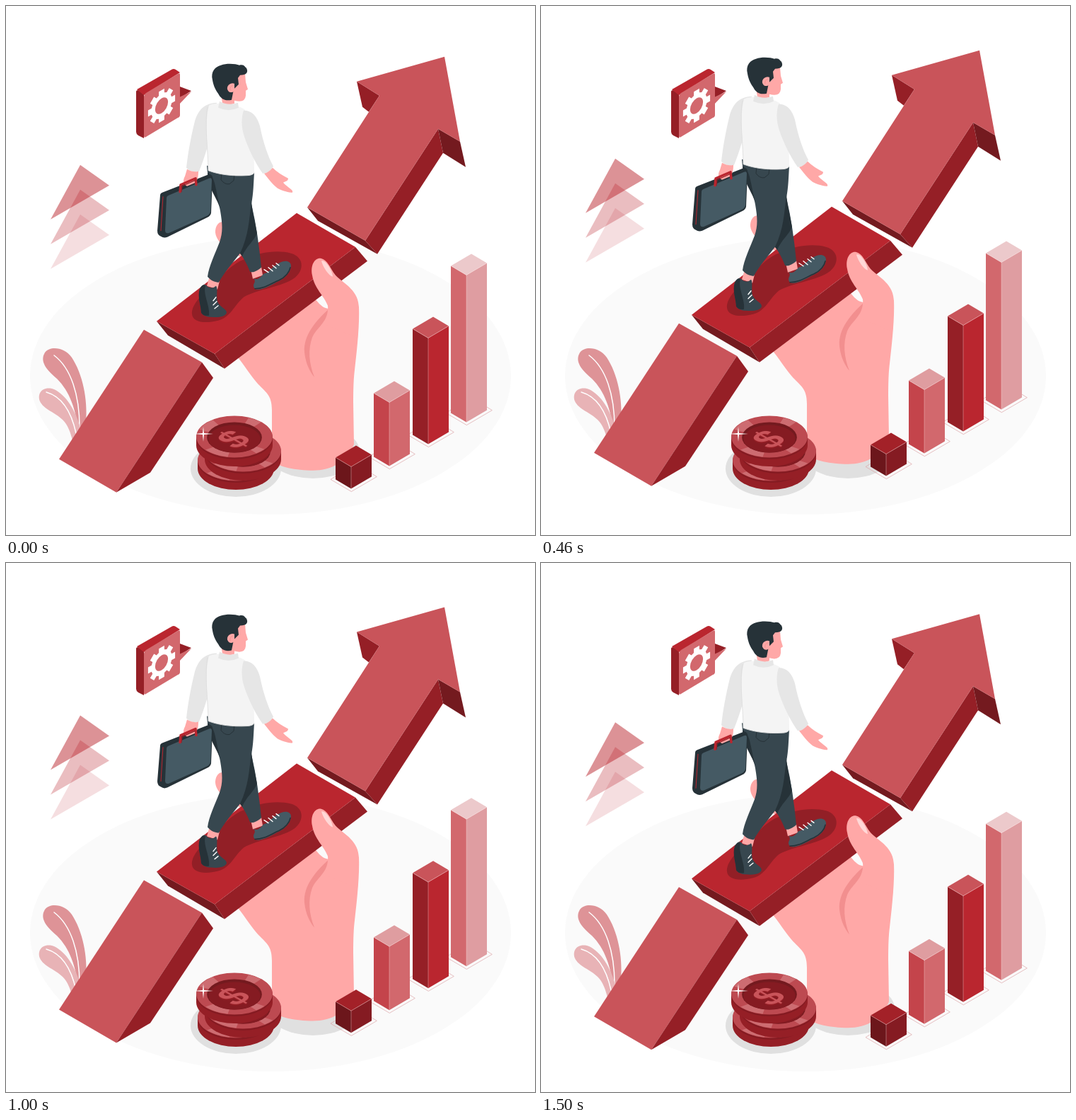
An HTML page with a canvas for the animation above (1.54 s loop, 748 px wide and 748 px high).

```html
<!DOCTYPE html>
<html lang="en">
<head>
<meta charset="utf-8">
<title>Growth</title>
<style>
html, body { margin: 0; width: 100%; height: 100%; overflow: hidden; background: #fff; }
canvas { display: block; width: 748px; height: 748px; }
</style>
</head>
<body>
<canvas id="stage" width="748" height="748"></canvas>
<script>
const ctx = document.getElementById('stage').getContext('2d');
const LOOP = 1540, LEAD = 35, RISE = 15;
const RED = '#ba262f', DEEP = '#951f26', DARK = '#741a1f', ROSE = '#c9545a', PALE = '#d2686d';
const SKIN = '#ffa8a7', SKIN_SHADE = '#f28f8f', INK = '#263238', SLATE = '#37474f', STEEL = '#455a64';
const SLEEVE = '#e6e6e6';

const paths = new Map();
function path(d) {
  if (!paths.has(d)) paths.set(d, new Path2D(d));
  return paths.get(d);
}
function fill(color, d) {
  ctx.fillStyle = color;
  ctx.fill(path(d));
}
function line(color, width, d) {
  ctx.strokeStyle = color;
  ctx.lineWidth = width;
  ctx.lineCap = ctx.lineJoin = 'round';
  ctx.stroke(path(d));
}
function oval(color, x, y, rx, ry) {
  ctx.fillStyle = color;
  ctx.beginPath();
  ctx.ellipse(x, y, rx, ry, 0, 0, Math.PI * 2);
  ctx.fill();
}
function shifted(x, y, draw) {
  ctx.save();
  ctx.translate(x, y);
  draw();
  ctx.restore();
}

function drawGround() {
  oval('#fafafa', 374, 523, 340, 196);
  oval('#e0e0e0', 434, 630, 66, 38);
  oval('#e0e0e0', 325, 654, 64, 40);
}

function drawLeaves() {
  fill('#de9397', 'M113 590C116 555 108 520 93 497C83 483 63 480 55 490C47 503 58 515 72 527C90 545 99 570 103 605Z');
  line('#fff', 1.5, 'M68 494C92 512 104 550 104 596');
  fill('#e8b3b6', 'M105 596C97 567 81 546 65 541C50 538 44 549 48 559C53 570 70 575 80 585C88 593 91 603 94 614Z');
  line('#fff', 1.5, 'M57 546C78 552 92 572 99 604');
}

function drawGear() {
  fill(DEEP, 'M184 121Q184 119 187 119L195 125V187L187 183Q184 181 184 178Z');
  fill(RED, 'M185 118L234 90Q237 88 240 90L246 94L195 126Z');
  fill(PALE, 'M195 128Q195 125 198 123L243 96Q246 94 246 97V154Q246 157 243 158L198 185Q195 187 195 184Z');
  fill(DEEP, 'M246 114L262 120L246 130Z');
  fill(PALE, 'M245 129L262 121L245 139Z');
  ctx.save();
  ctx.transform(.866, -.5, 0, 1, 220, 141);
  ctx.fillStyle = '#fff';
  ctx.beginPath();
  for (let i = 0; i < 8; i++) {
    const a = i * Math.PI / 4;
    for (const [da, r] of [[-.27, 17], [-.2, 22.5], [.2, 22.5], [.27, 17]])
      ctx.lineTo(r * Math.cos(a + da), r * Math.sin(a + da));
  }
  ctx.closePath();
  ctx.moveTo(10.5, 0);
  ctx.arc(0, 0, 10.5, 0, Math.PI * 2, true);
  ctx.fill();
  ctx.restore();
}

function drawTriangles() {
  [.5, .3, .15].forEach((alpha, i) => shifted(0, i * 35, () => {
    ctx.globalAlpha = alpha;
    fill(RED, 'M105 225L146 254L63 302Z');
  }));
}

function drawArrow() {
  fill(ROSE, 'M195 458L277 504L156 688L75 641Z');
  fill(DEEP, 'M277 504L293 526L204 660L156 688Z');

  fill(DEEP, 'M496 107L528 127L513 150L504 143Z');
  fill(DARK, 'M426 285L508 332L525 351L441 304Z');
  fill(DEEP, 'M611 174L618 208L525 351L508 332Z');
  fill(DARK, 'M611 174L642 192L650 228L618 208Z');
  fill(ROSE, 'M620 72L642 192L611 174L508 332L426 285L528 127L496 107Z');
}

function drawPlatform() {
  fill(DARK, 'M213 446L295 492L309 513L229 466Z');
  fill(DEEP, 'M295 492L494 341L511 361L309 513Z');
  fill(RED, 'M213 446L411 293L494 341L295 492Z');
  fill('#921f26', 'M263 436C262 424 274 411 288 398C306 382 318 365 338 358C358 348 385 345 403 350C421 355 422 373 409 384C391 398 356 400 336 412C322 424 318 440 300 445C280 450 264 447 263 436Z');
}

function drawPalm() {
  fill(SKIN, 'M337 358C314 347 295 333 296 318C297 308 303 304 309 306L345 330Z');
  fill(SKIN, 'M326 495L425 400L441 419C447 426 452 428 456 428L499 425C500 450 497 480 493 515Q491 530 491 560L492 620C482 645 460 657 434 657C410 657 385 652 376 643V572C376 549 367 547 354 532C344 520 337 508 326 495Z');
}

function drawThumb() {
  fill(SKIN, 'M433 381C430 366 437 356 445 357C455 359 458 371 466 381C479 394 499 402 499 428L497 470L449 450C454 444 456 434 455 424C450 410 436 400 433 381Z');
  fill('#ffd8d7', 'M446 361C451 358 461 373 462 383C456 381 449 371 446 361Z');
  fill(SKIN_SHADE, 'M455 430C440 444 420 465 422 490C424 508 431 519 436 525C428 505 427 485 433 469C439 455 454 448 455 430Z');
}

function drawLegs() {
  fill(SKIN, 'M288 382L302 389L299 401L284 396Z');
  fill(SKIN, 'M345 368L361 369L363 381L349 386Z');
  fill(STEEL, 'M349 383C352 389 358 387 364 379C373 377 375 370 384 365C393 359 403 360 403 368C402 377 396 384 386 389C376 394 364 402 355 401C350 400 349 396 351 392C353 389 351 386 349 383Z');
  line(INK, 1.6, 'M352 400C366 400 376 392 386 388C395 384 401 376 402 370');
  line('#fff', 1.4, 'M365 373L371 377M371 370L377 375M377 367L382 371M382 364L386 367');
  fill(SLATE, 'M274 401C277 393 282 392 285 397Q292 401 297 396C300 400 297 409 299 418C303 427 312 428 312 434C310 440 300 441 290 440C284 440 279 438 276 434C276 425 271 412 274 401Z');
  fill(INK, 'M274 400Q278 393 282 396C278 407 289 425 287 438Q279 439 276 434C276 424 270 412 274 400Z');
  line('#fff', 1.4, 'M297 412L293 417M298 418L293 423M300 424L295 428');

  fill(SLATE, 'M284 226C286 258 300 270 303 290C306 308 307 320 302 334C295 352 287 368 285 383C290 389 296 391 301 391C308 378 319 365 331 350C337 358 341 366 345 376C350 378 356 374 361 370C358 340 354 310 347 280C350 265 350 250 351 236Z');
  fill(INK, 'M347 276C348 292 353 308 355 322C350 333 340 340 334 354L331 350C343 325 344 302 347 276Z');
  fill(INK, 'M285 236C296 240 296 260 303 286C296 268 286 258 285 236Z');
  line(INK, 1, 'M305 236L304 246Q309 253 316 252L322 247L323 238');
}

function drawTorso() {
  fill(SLEEVE, 'M298 137C279 138 272 148 267 163C261 187 257 210 255 229C261 235 268 236 273 234C281 215 286 195 292 175Z');
  fill('#f4f4f4', 'M287 141C293 136 324 137 338 147C343 175 352 200 351 236Q349 240 340 240C321 241 302 239 286 233C286 205 280 165 287 141Z');
  line('#dedede', .9, 'M285 143C280 165 286 205 286 233C302 239 321 241 340 240Q349 240 351 236');
  fill(SLEEVE, 'M336 148C348 148 355 156 359 170C364 195 371 214 378 227C374 234 369 237 363 237C354 225 343 203 337 185C332 170 333 157 336 148Z');
  fill(SKIN, 'M365 237C370 243 376 252 384 258C392 262 400 264 405 264C407 260 398 257 392 250C395 248 399 248 399 244C391 240 383 235 377 229Q371 236 365 237Z');
}

function drawHead() {
  fill(SKIN, 'M304 125L306 138Q314 142 323 138V134Q338 138 339 127L339 120L342 118L339 108L338 96L318 97Z');
  fill(SLEEVE, 'M302 135Q314 142 328 137L329 144Q315 151 300 144Z');
  fill(INK, 'M292 105C289 93 296 86 304 84C312 81 325 82 330 84C337 82 338 87 340 88C343 94 340 98 331 98L328 102L329 111L322 118L319 133C310 135 304 132 300 124C295 117 293 111 292 105Z');
  fill(SKIN, 'M323 110C318 108 312 112 313 118C315 124 321 123 323 120Z');
  line(SKIN_SHADE, .9, 'M320 113Q316 114 317 119');
}

function drawCase() {
  fill(INK, 'M221 264L285 239Q292 237 292 244L290 293Q289 297 285 299L228 327Q223 329 219 326Q214 324 214 318L218 268Q218 265 221 264Z');
  fill(STEEL, 'M230 268L287 244Q291 242 291 247L289 291Q288 295 284 297L231 321Q225 323 225 317L227 272Q227 269 230 268Z');
  line(RED, 1, 'M222 270L219 318');
  fill(SKIN, 'M256 231Q265 236 272 234C272 241 271 246 268 250L256 255C250 252 250 246 253 241Z');
  line(RED, 3.4, 'M246 263L247 253L268 244L269 253');
  line(DEEP, 1.2, 'M248 263L249 255L267 247');
}

function ringSector(color, rx, ry, from, to) {
  ctx.fillStyle = color;
  ctx.beginPath();
  ctx.ellipse(0, 0, rx, ry, 0, from, to);
  ctx.ellipse(0, 1, rx * .71, ry * .71, 0, to, from, true);
  ctx.fill();
}
function drawCoin(x, y) {
  const rx = 54, ry = 30, depth = 12;
  shifted(x, y, () => {
    oval(DEEP, 0, depth, rx, ry);
    ctx.fillStyle = DEEP;
    ctx.fillRect(-rx, 0, rx * 2, depth);
    oval('#851b22', 0, 2, rx, ry);
    oval('#bd4a51', 0, 0, rx, ry - .5);
    for (const [from, to] of [[.65, .95], [1.75, 2.45], [3.5, 4.1], [5.1, 5.5]])
      ringSector('#cd6c71', rx - 1, ry - 1, from, to);
    oval(DARK, 0, 1, rx * .72, ry * .72);
    oval('#851b22', 0, 3, rx * .68, ry * .65);
  });
}
function drawCoins() {
  drawCoin(325, 642);
  drawCoin(335, 629);
  drawCoin(323, 609);
  ctx.save();
  ctx.transform(.85, -.47, .85, .47, 323, 613);
  ctx.font = 'bold 52px "Liberation Sans", Arial, sans-serif';
  ctx.textAlign = 'center';
  ctx.textBaseline = 'middle';
  for (const [color, drop] of [[DEEP, 2], [ROSE, 0]]) {
    ctx.fillStyle = color;
    ctx.fillText('$', -drop, drop + 2);
  }
  ctx.restore();
  fill('#fff', 'M279 595L280 604L293 605L280 606L279 616L278 606L266 605L278 604Z');
}

const bars = [
  { x: 651, top: 381, foot: 589, colors: ['#ecc9cb', PALE, '#df9da1'] },
  { x: 597, top: 470, foot: 620, colors: [ROSE, DEEP, RED] },
  { x: 542, top: 561, foot: 651, colors: ['#df9da0', '#c4444b', PALE] },
  { x: 488, top: 652, foot: 683, colors: ['#a32128', '#6c161b', '#851b22'] }
];
function drawBar({ x, top, foot, colors: [lid, left, right] }) {
  const h = foot - top;
  shifted(x, top, () => {
    line('#dda5a8', .7, `M0 ${h + 4}L-29 ${h - 13}L7 ${h - 35}L36 ${h - 17}Z`);
    fill(left, `M0 0L-22 -13V${h - 13}L0 ${h}Z`);
    fill(right, `M0 0L29 -17V${h - 17}L0 ${h}Z`);
    fill(lid, 'M0 0L-22 -13L7 -30L29 -17Z');
    line('rgba(255,225,225,.45)', .8, `M0 ${h}V0L-22 -13M0 0L29 -17`);
  });
}

function render(now) {
  const phase = ((now + LEAD) % LOOP) / LOOP;
  const lift = RISE * (1 - Math.abs(2 * phase - 1));
  ctx.fillStyle = '#fff';
  ctx.fillRect(0, 0, 748, 748);
  drawGround();
  drawLeaves();
  drawGear();
  shifted(0, .4 - lift, () => {
    drawTriangles();
    drawPalm();
    drawArrow();
    drawPlatform();
    drawThumb();
    drawLegs();
    drawTorso();
    drawHead();
    drawCase();
  });
  drawCoins();
  shifted(0, .8 - 2 * lift, () => bars.forEach(drawBar));
}

const start = performance.now();
function tick() {
  render(performance.now() - start);
  requestAnimationFrame(tick);
}
tick();
</script>
</body>
</html>
```
